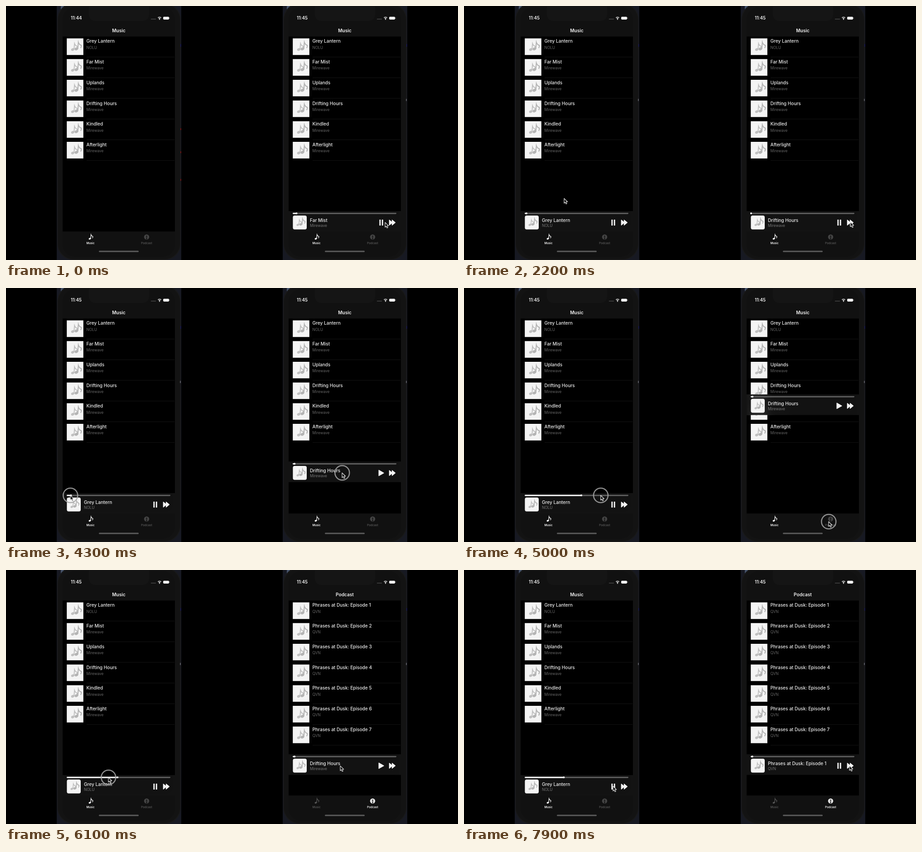
An HTML page with a canvas for the animation above (8 s loop, 998 by 561 pixels).

```html
<!DOCTYPE html>
<html lang="en">
<head>
<meta charset="utf-8">
<title>Mini player</title>
<style>
html, body { margin: 0; width: 100%; height: 100%; overflow: hidden; background: #000; }
canvas { display: block; width: 998px; height: 561px; }
</style>
</head>
<body>
<canvas width="998" height="561"></canvas>
<script>
const canvas = document.querySelector('canvas');
const ctx = canvas.getContext('2d');
const LOOP = 8000, ROW = 45.7, PHONE_GAP = 499, PLAY_RATE = 0.0025;
const LEFT = 125, WIDTH = 248, BAR_TOP = 453, BAR_HEIGHT = 45.5;
const WHITE = '#f4f4f4', TITLE = '#eee';

const BAND = 'Mirewave';
const songs = ['Far Mist', 'Uplands', 'Drifting Hours', 'Kindled', 'Afterlight'];
const music = [['Grey Lantern', 'NOLU'], ...songs.map(title => [title, BAND])];
const podcasts = Array.from({ length: 7 }, (_, i) => [`Phrases at Dusk: Episode ${i + 1}`, 'QVN']);

// Places the pointers visit, in phone coordinates
const spot = {
  firstRow: [239, 84], idle: [221, 425], knob: [142, 458], pause: [329, 477.5],
  next: [354, 477], raisedNext: [352, 432], tab: [306, 516],
  grab: [243, 478], raised: [243, 260], regrab: [239, 277], lowered: [239, 449], away: [289, 330]
};
const scrub = x => [x, 458];

// Each move: start ms, end ms, destination
const leftMoves = [
  [1500, 2200, spot.idle], [3100, 3650, spot.knob], [4400, 5150, scrub(320)],
  [5200, 5620, scrub(255)], [5800, 6250, scrub(216)], [6900, 7650, spot.pause]
];
const rightMoves = [
  [0, 400, spot.next], [3100, 3450, spot.pause], [3900, 4150, spot.grab],
  [4150, 4550, spot.raised], [4650, 4900, spot.tab], [5150, 5450, spot.regrab],
  [5480, 5815, spot.lowered], [6050, 6450, spot.firstRow],
  [6650, 6800, spot.away], [6850, 7100, spot.raisedNext]
];
const drags = [[4150, 4600], [5480, 5950]];
const taps = [3500, 4950, 6500].map(start => [start, start + 120]);
const SCRUB = [3800, 6750], PAUSED = [3500, 6600], SCRUB_LAG = 150;
const queue = [[-3200, music[1]], [500, music[2]], [2050, music[3]], [6600, podcasts[0]]];

const clamp = (v, lo, hi) => Math.min(hi, Math.max(lo, v));
const within = (t, [from, to]) => t >= from && t < to;

function ease(t, from, to) {
  const u = clamp((t - from) / (to - from), 0, 1);
  return u * u * (3 - 2 * u);
}

function travel(t, start, moves) {
  return moves.reduce((place, [from, to, goal]) => {
    const e = ease(t, from, to);
    return place.map((v, i) => v + (goal[i] - v) * e);
  }, start);
}

const leftPointer = t => travel(t, spot.firstRow, leftMoves);
const rightPointer = t => travel(t, [338, 478], rightMoves);

// The player follows the pointer vertically during each drag
const playerLift = t => drags.reduce((sum, [from, to]) =>
  sum + rightPointer(clamp(t, from, to))[1] - rightPointer(from)[1], 0);

function rect(x, y, w, h, color, r = 0) {
  ctx.fillStyle = color;
  ctx.beginPath();
  ctx.roundRect(x, y, w, h, r);
  ctx.fill();
}

function disc(x, y, r, color) {
  rect(x - r, y - r, 2 * r, 2 * r, color, r);
}

function triangle(x, y, w, h) {
  ctx.fillStyle = ctx.strokeStyle = WHITE;
  ctx.lineWidth = 1.4;
  ctx.lineJoin = 'round';
  ctx.beginPath();
  ctx.moveTo(x, y - h / 2);
  ctx.lineTo(x + w, y);
  ctx.lineTo(x, y + h / 2);
  ctx.closePath();
  ctx.fill();
  ctx.stroke();
}

function text(s, x, y, size, color, weight = 400, align = 'left') {
  ctx.font = `${weight} ${size}px Inter, sans-serif`;
  ctx.fillStyle = color;
  ctx.textAlign = align;
  ctx.fillText(s, x, y);
}

function note(x, y, size, color) {
  ctx.save();
  ctx.translate(x, y);
  ctx.scale(size, size);
  ctx.fillStyle = ctx.strokeStyle = color;
  ctx.beginPath();
  ctx.ellipse(0, 0, 0.27, 0.2, -0.4, 0, 7);
  ctx.fill();
  ctx.lineWidth = 0.14;
  ctx.beginPath();
  ctx.moveTo(0.2, 0);
  ctx.lineTo(0.28, -0.95);
  ctx.quadraticCurveTo(0.4, -0.6, 0.72, -0.5);
  ctx.quadraticCurveTo(0.75, -0.3, 0.6, -0.12);
  ctx.stroke();
  ctx.restore();
}

function artwork(x, y, size, radius = 0) {
  rect(x, y, size, size, '#f4f4f4', radius);
  note(x + size * 0.36, y + size * 0.67, size * 0.38, '#c0c0c0');
  note(x + size * 0.58, y + size * 0.63, size * 0.42, '#b4b4b4');
}

function statusBar(clock) {
  text(clock, 143, 30.2, 9.9, WHITE, 600);
  rect(320, 28.3, 11, 1.2, '#555');
  ctx.strokeStyle = WHITE;
  ctx.lineWidth = 1.5;
  for (const r of [2.5, 5]) {
    ctx.beginPath();
    ctx.arc(339, 29.6, r, -2.35, -0.8);
    ctx.stroke();
  }
  disc(339, 29.4, 1.1, WHITE);
  rect(347, 23.7, 13, 6.2, WHITE, 1.8);
  rect(360.6, 25.4, 1, 2.6, '#999');
}

function tabs(podcast) {
  const shade = on => on ? WHITE : '#555';
  const mark = podcast ? '#333' : '#171717';
  note(185, 514, 9.5, shade(!podcast));
  disc(310.5, 510.3, 5.7, podcast ? '#e4e4e4' : '#444');
  disc(310.5, 508.6, 1.5, mark);
  rect(309.4, 510.6, 2.2, 5, mark, 1);
  text('Music', 186.5, 526, 6.2, shade(!podcast), 600, 'center');
  text('Podcast', 310.5, 526, 6.2, shade(podcast), 600, 'center');
}

function shell(fresh) {
  rect(112, 0, 275, 561, '#171922');
  rect(121, 0, 7, 8, '#46536a', 1);
  rect(113, -6, 273, 567, '#191919', 36);
  rect(115, -4, 269, 563, '#131313', 34);
  rect(LEFT, 2, WIDTH, 552, '#111', 28);
  rect(183, -10, 133, 43, '#151515', 14);
  rect(385, 84, 2, 6, '#15154a');
  if (fresh) rect(384, 205, 2, 5, '#55555c');
  else for (const y of [270, 321, 382]) rect(385, y, 2, 4, '#681414');
}

function list(items) {
  rect(LEFT, 67.5, WIDTH, 430.5, '#000');
  items.forEach(([title, artist], i) => {
    const y = 71.6 + i * ROW;
    artwork(134.2, y, 36.6);
    text(title, 177.5, y + 9.8, 10.1, TITLE, 500);
    text(artist, 177.5, y + 23.1, 8.3, '#646464');
    rect(178, y + 40.6, 194, 1, '#141414');
  });
}

// Blurs whatever lies beneath the bar, then tints it
function frostedPanel(top) {
  const margin = 30, x = LEFT - margin, y = top - margin;
  const w = WIDTH + 2 * margin, h = BAR_HEIGHT + 2 * margin;
  ctx.save();
  ctx.beginPath();
  ctx.rect(LEFT, top, WIDTH, BAR_HEIGHT);
  ctx.clip();
  ctx.filter = 'blur(9px)';
  ctx.drawImage(canvas, x + ctx.getTransform().e, y, w, h, x, y, w, h);
  ctx.restore();
  rect(LEFT, top, WIDTH, BAR_HEIGHT, 'rgba(20,20,20,.9)');
}

function player([title, artist], fill, playing, lift) {
  frostedPanel(BAR_TOP + lift);
  ctx.save();
  ctx.translate(0, lift);
  rect(134, 456.7, 229, 2.8, '#626262', 1.4);
  rect(134, 456.7, fill - 134, 2.8, '#fff', 1.4);
  disc(fill - 0.5, 458.1, 2, '#fff');
  artwork(134.4, 462.8, 30.6, 4);
  text(title, 172, 476.5, 10.1, TITLE, 500);
  text(artist, 172, 488, 8.3, '#757575');
  if (playing) for (const x of [325.4, 330.8]) rect(x, 471.8, 2.9, 13.2, WHITE, 0.8);
  else triangle(324.2, 478.3, 10.8, 12.2);
  for (const x of [347.4, 353.6]) triangle(x, 478.3, 6.8, 11.2);
  ctx.restore();
}

function phone({ clock, podcast = false, fresh, track, fill, playing, lift = 0 }) {
  shell(fresh);
  statusBar(clock);
  text(podcast ? 'Podcast' : 'Music', 249, 57.6, 10.1, WHITE, 600, 'center');
  list(podcast ? podcasts : music);
  if (track) player(track, fill, playing, lift);
  tabs(podcast);
  rect(205, 540.4, 88, 3, '#5c5c5c', 1.5);
}

function pointer([x, y], pressed) {
  ctx.save();
  ctx.translate(x, y);
  if (pressed) {
    ctx.strokeStyle = 'rgba(165,165,165,.85)';
    ctx.lineWidth = 2.5;
    ctx.beginPath();
    ctx.arc(0.3, 0, 16, 0, 7);
    ctx.stroke();
  }
  const arrow = new Path2D('M0 0V10.5L2.5 8.3 4.2 12.3 6.2 11.4 4.5 7.6 7.7 7.5Z');
  ctx.fillStyle = '#111';
  ctx.fill(arrow);
  ctx.lineJoin = 'round';
  ctx.strokeStyle = '#e4e4e4';
  ctx.lineWidth = 1.1;
  ctx.stroke(arrow);
  ctx.restore();
}

function leftPhone(t) {
  const fresh = t >= 300;
  const scrubEnd = SCRUB[1];
  let fill = 135 + (t - 800) * PLAY_RATE;
  if (t >= SCRUB[0]) {
    const held = leftPointer(Math.min(t, scrubEnd) - SCRUB_LAG)[0];
    fill = held + 2 + Math.max(0, t - scrubEnd) * PLAY_RATE;
  }
  phone({ fresh, clock: fresh ? '11:45' : '11:44', track: t >= 800 && music[0], fill, playing: true });
  if (fresh) pointer(leftPointer(t), within(t, SCRUB));
}

function rightPhone(t) {
  const [start, track] = queue.findLast(([from]) => t >= from);
  const paused = within(t, PAUSED);
  const fill = 135 + ((paused ? PAUSED[0] : t) - start) * PLAY_RATE;
  phone({
    fresh: true, clock: '11:45', podcast: t >= 5100,
    track, fill, playing: !paused, lift: playerLift(t)
  });
  pointer(rightPointer(t), [...drags, ...taps].some(span => within(t, span)));
}

function draw(t) {
  rect(0, 0, 998, 561, '#000');
  leftPhone(t);
  ctx.save();
  ctx.translate(PHONE_GAP, 0);
  rightPhone(t);
  ctx.restore();
}

function tick() {
  draw(performance.now() % LOOP);
  requestAnimationFrame(tick);
}
tick();
</script>
</body>
</html>
```
